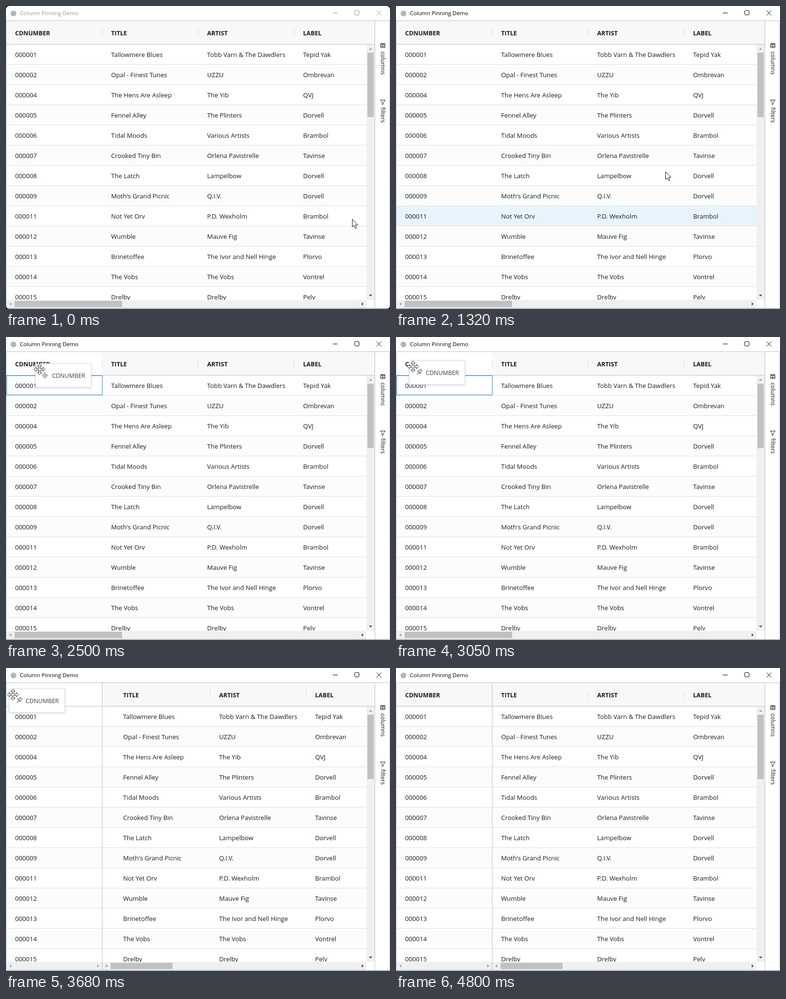
Animation, 800 px wide and 630 px high, one loop 5.55 s. Source, as an HTML page with a canvas:

```html
<!DOCTYPE html>
<html lang="en">
<head>
<meta charset="utf-8">
<title>Column Pinning Demo</title>
<style>
html, body { margin: 0; width: 100%; height: 100%; overflow: hidden; background: #fff; }
canvas { display: block; }
</style>
</head>
<body>
<canvas id="stage" width="800" height="630"></canvas>
<script>
const ctx = document.getElementById('stage').getContext('2d');
const LOOP = 5550, ROW = 42, TOP = 80;
const LINE = '#babfc7', INK = '#181d1f';

const heads = ['CDNUMBER', 'TITLE', 'ARTIST', 'LABEL'];
const rows = `000001|Tallowmere Blues|Tobb Varn & The Dawdlers|Tepid Yak
000002|Opal - Finest Tunes|UZZU|Ombrevan
000004|The Hens Are Asleep|The Yib|QVJ
000005|Fennel Alley|The Plinters|Dorvell
000006|Tidal Moods|Various Artists|Brambol
000007|Crooked Tiny Bin|Orlena Pavistrelle|Tavinse
000008|The Latch|Lampelbow|Dorvell
000009|Moth's Grand Picnic|Q.I.V.|Dorvell
000011|Not Yet Orv|P.D. Wexholm|Brambol
000012|Wumble|Mauve Fig|Tavinse
000013|Brinetoffee|The Ivor and Nell Hinge|Plorvo
000014|The Vobs|The Vobs|Vontrel
000015|Drelby|Drelby|Pelv`.split('\n').map(line => line.split('|'));

// Bursts of screen updates: first, last, count
const ticks = [[0, 80, 2], [660, 660, 1], [1320, 1550, 4], [1880, 2420, 8], [2500, 3050, 8],
  [3130, 3680, 8], [3770, 3770, 1], [4100, 4570, 7], [4660, 4800, 3]]
  .flatMap(([a, b, n]) => Array.from({ length: n },
    (_, i) => Math.floor((a + (n > 1 ? (b - a) * i / (n - 1) : 0)) / 10) * 10));

// Pointer path: time, x, y
const path = [[0, 721, 443], [80, 713, 443], [1240, 713, 443], [1550, 124, 60], [1880, 124, 60],
  [1950, 113, 65], [2420, 75, 68], [3050, 35.5, 61.5], [3680, 14.5, 55.5], [4100, 14.5, 55.5],
  [4170, 24, 56], [4410, 88, 98], [4490, 93, 157], [4570, 97, 210], [4660, 104, 330], [4730, 110, 560]];

function pointer(t) {
  const i = path.findIndex(p => p[0] > t);
  if (i < 0) return path[path.length - 1].slice(1);
  const [a, b] = [path[i - 1], path[i]], k = (t - a[0]) / (b[0] - a[0]);
  return [a[1] + (b[1] - a[1]) * k, a[2] + (b[2] - a[2]) * k];
}

function rect(x, y, w, h, color) {
  ctx.fillStyle = color;
  ctx.fillRect(x, y, w, h);
}

function text(str, x, y, size = 13.2, color = INK, weight = 400) {
  ctx.font = `${weight} ${size}px "Open Sans", sans-serif`;
  ctx.fillStyle = color;
  ctx.fillText(str, x, y);
}

function shape(x, y, d, stroke, fill, width = 1) {
  const p = new Path2D(d);
  ctx.save();
  ctx.translate(x, y);
  if (fill) { ctx.fillStyle = fill; ctx.fill(p); }
  if (stroke) { ctx.strokeStyle = stroke; ctx.lineWidth = width; ctx.stroke(p); }
  ctx.restore();
}

function clipped(x, y, w, h, draw) {
  ctx.save();
  ctx.beginPath();
  ctx.rect(x, y, w, h);
  ctx.clip();
  draw();
  ctx.restore();
}

function moveIcon(x, y, scale, fill) {
  ctx.save();
  ctx.translate(x, y);
  ctx.scale(scale, scale);
  ctx.beginPath();
  for (let i = 0; i < 4; i++) {
    for (const p of [[-1.5, -1.5], [-1.5, -7], [-4.5, -7], [0, -11.5], [4.5, -7], [1.5, -7]]) ctx.lineTo(...p);
    ctx.rotate(Math.PI / 2);
  }
  ctx.closePath();
  ctx.fillStyle = fill;
  ctx.strokeStyle = '#222';
  ctx.lineWidth = 1;
  ctx.fill();
  ctx.stroke();
  ctx.restore();
}

function titleBar(active) {
  const ink = active ? '#000' : '#999';
  shape(15.5, 15.5, 'M-6 0a6 6 0 1 0 12 0a6 6 0 1 0-12 0', null, '#b4b7ba');
  text('Column Pinning Demo', 29, 19, 11.6, ink);
  shape(681, 14.5, 'M0 0h10', ink);
  shape(726.5, 9.5, 'M1 0h7q1 0 1 1v7q0 1-1 1h-7q-1 0-1-1v-7q0-1 1-1z', ink);
  shape(772, 9.5, 'M0 0l10 10M10 0l-10 10', ink);
}

function sideBar() {
  rect(768, 31, 1, 598, LINE);
  shape(780.5, 78.5, 'M0 0h9v8h-9zM0 1h9M0 5h9M4.5 2v6', INK);
  shape(785, 195.5, 'M-5 0h10l-3.7 4.8v3l-2.6 2v-5z', INK);
  for (const [word, y] of [['columns', 94.5], ['filters', 210.5]]) {
    ctx.save();
    ctx.translate(780.5, y);
    ctx.rotate(Math.PI / 2);
    text(word, 0, 0, 12.2);
    ctx.restore();
  }
}

function hScroll(x, w, thumb, endColor) {
  rect(x, 611, w, 17, '#f0f0f0');
  if (thumb) rect(x + 17, 613, thumb, 13, '#c1c1c1');
  shape(x + 6, 619.5, 'M0 0l4-3.5v7z', null, '#a3a3a3');
  shape(x + w - 6, 619.5, 'M0 0l-4-3.5v7z', null, endColor);
}

function scrollBars(pinned) {
  rect(751, TOP, 17, 531, '#f0f0f0');
  rect(753, 97, 13, 134, '#c1c1c1');
  shape(759.5, 87, 'M0 0l-3.5 4h7z', null, '#a3a3a3');
  shape(759.5, 604, 'M0 0l-3.5-4h7z', null, '#505050');
  if (pinned) hScroll(1, 199, 0, '#a3a3a3');
  const x = pinned ? 201 : 1;
  hScroll(x, 751 - x, pinned ? 129 : 224, '#505050');
}

function columns(from, to, shift) {
  for (let c = from; c < to; c++) {
    const x = 19 + 200 * c + shift;
    text(heads[c], x, 61, 12.6, INK, 700);
    if (c < 3) rect(200 * (c + 1) + shift, 48, 1, 14, '#d6d9dd');
    rows.forEach((row, r) => text(row[c], x, TOP + ROW * r + 26));
  }
}

function rowTint(t, r) {
  if (t >= 660 && t < 1320) return { 6: '#f9fefe', 7: '#f5f9fb', 8: '#f8fefe' }[r];
  const moving = t >= 1320 && t < 1550 || t > 4200 && t < 4800;
  if (moving && Math.floor((pointer(t - 80)[1] - TOP) / ROW) === r) return '#e7f4fe';
}

function grid(t, dragging) {
  const pinned = t >= 3524;
  const u = Math.min(1, (t - 3524) / 200);
  const shift = pinned ? Math.round(200 * (1 - u * u * (3 - 2 * u))) : 0;

  rect(1, 31, 767, 48, '#f8f8f8');
  if (dragging) rect(1, 31, 200, 48, '#fff');
  rect(0, 79, 768, 1, LINE);
  clipped(1, 31, 750, 580, () => {
    rows.forEach((_, r) => {
      const y = TOP + ROW * r;
      rect(1, y, 750, ROW, rowTint(t, r) || (r % 2 ? '#fcfcfc' : '#fff'));
      rect(1, y + ROW - 1, 750, 1, '#dcdfe4');
    });
    columns(0, 1, 0);
    if (t >= 1550 && !pinned) shape(1.5, 80.5, 'M0 0h199v40h-199z', '#3585c0');
    clipped(pinned ? 201 : 1, 31, 750, 580, () => columns(1, 4, shift));
  });
  scrollBars(pinned);
  if (pinned) rect(200, 31, 1, 597, LINE);
  if (t > 4150 && t < 4600) shape(170, 51.5, 'M0 0h10M0 3.5h10M0 7h10', '#cdd0d4');
}

function ghost(x, y) {
  const left = Math.round(x - 9), top = Math.round(y - 12.6);
  ctx.save();
  ctx.shadowColor = 'rgba(150,160,170,.45)';
  ctx.shadowBlur = 4;
  ctx.shadowOffsetY = 1;
  ctx.fillStyle = '#fff';
  ctx.beginPath();
  ctx.roundRect(left, top, 117, 50, 2);
  ctx.fill();
  ctx.restore();
  shape(left + .5, top + .5, 'M1 0h114q1 0 1 1v47q0 1-1 1h-114q-1 0-1-1v-47q0-1 1-1z', '#d8dce2');
  text('CDNUMBER', left + 35, top + 30, 12.4, '#3c4042');
  if (x >= 50) return moveIcon(left + 20, top + 25, .55, '#fff');
  ctx.save();
  ctx.translate(left + 21, top + 24.5);
  ctx.rotate(Math.PI / 4);
  shape(0, 0, 'M-2.5-6.5h5M-2-6.5v4l-2 2.5h8l-2-2.5v-4M0 0v6.5', '#444');
  ctx.restore();
}

function cursor(x, y, dragging) {
  if (dragging) moveIcon(x, y, 1, '#fff');
  else if (y < TOP) {
    shape(x, y + 1.5, 'M-2 13V2a2 2 0 0 1 4 0v6c1-1 3-1 3.5.6c1-.8 2.8-.4 3.2.9c1.2-.6 2.5.2 2.5 1.8v4.5' +
      'c0 2-1.2 3.5-2 5.2v2h-10v-2c-1.5-2-3-4.5-4.8-7.2c-1-1.6 1.2-3.2 2.6-1.6z', '#111', '#fff', 1.2);
    shape(x, y + 1.5, 'M2 8v4M5.5 9v3M8.7 10v2.5', '#111');
  } else shape(x + .5, y + .5, 'M0 0v16l3.7-3.5 2.5 6 2.7-1.1-2.5-5.9h5.1z', '#111', '#fff');
}

function windowFrame(active) {
  rect(0, 30, 800, 1, LINE);
  rect(0, 30, 1, 599, LINE);
  rect(799, 30, 1, 599, LINE);
  rect(0, 628, 800, 2, '#b4b7bb');
  if (active) return;
  const corners = new Path2D('M0 0h800v630h-800z');
  corners.roundRect(0, 0, 800, 630, 7);
  ctx.fillStyle = '#000';
  ctx.fill(corners, 'evenodd');
}

function draw(t) {
  const active = t >= 660, dragging = t > 1900 && t < 4150;
  const [x, y] = pointer(t);
  rect(0, 0, 800, 630, '#fff');
  titleBar(active);
  grid(t, dragging);
  sideBar();
  windowFrame(active);
  if (dragging) ghost(x, y);
  if (t < 4800) cursor(x, y, dragging);
}

const start = performance.now();
function tick() {
  const now = Math.max(0, performance.now() - start) % LOOP;
  draw(ticks.filter(time => time <= now).pop());
  requestAnimationFrame(tick);
}
tick();
</script>
</body>
</html>
```
